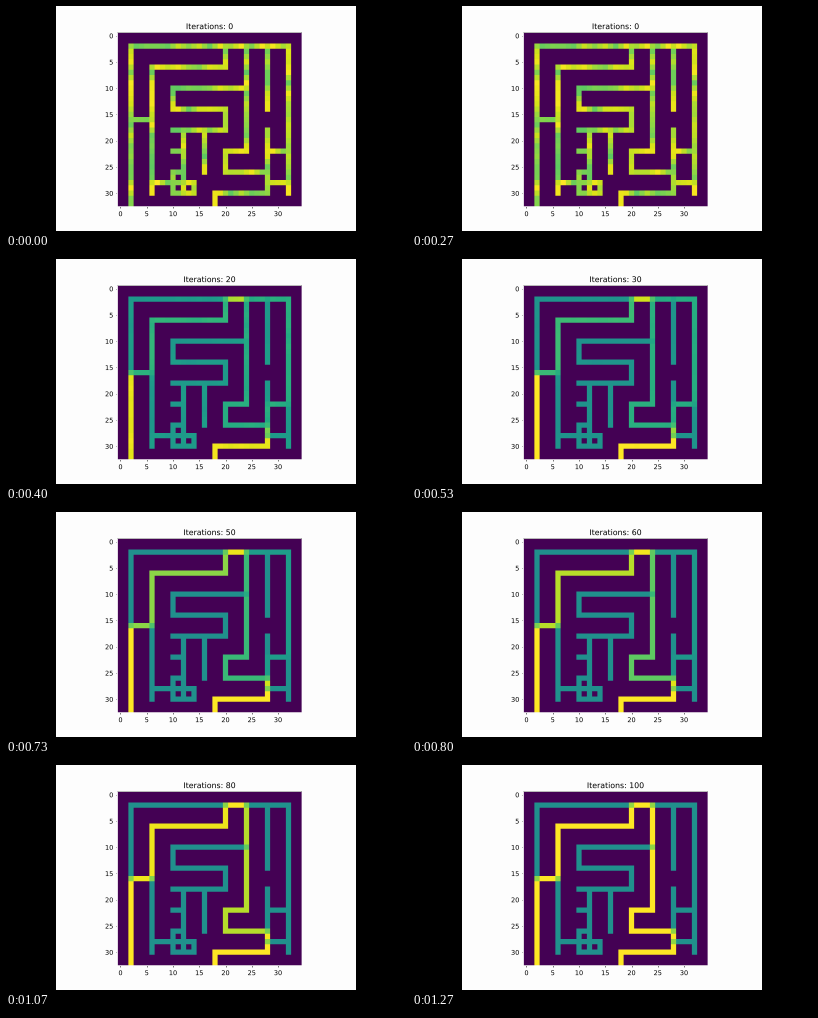
Animation, 400 px wide and 225 px high, one loop 1340 ms. Source, as a matplotlib script:

```python
import numpy as np
import matplotlib.pyplot as plt
from matplotlib.animation import FuncAnimation
from matplotlib.patches import Rectangle
from matplotlib.patheffects import Normal

ROWS, COLS = 33, 35
SCALE = 0.46875  # a default 640x480 figure shrunk to 300x225
SUB = 8          # subdivisions of a pixel
CELL = 42        # side of a maze cell in subdivisions (5.25 px)
LOOP, INTERVAL = 1340, 10
LAST_STEP = 10
DECAY = 0.35     # what is left of the starting tube after ten iterations
PAPER = "#fdfdfd"

# Flow through each kind of corridor, keyed by iteration / 10.
STEPS = [0, 1, 3, 5, 7, 10]
FLOW = {
    "entry": [0, 0.72, 0.97, 1, 1, 1],
    "join": [0, 0.35, 0.66, 0.85, 0.96, 1],
    "bridge": [0, 0.50, 0.82, 0.94, 0.98, 1],
    "left": [0, 0.08, 0.33, 0.65, 0.92, 1],
    "right": [0, 0.06, 0.23, 0.35, 0.66, 1],
    "detour": [0, 0.10, 0.20, 0.10, 0.03, 0],
    "dead": [0, 0, 0, 0, 0, 0],
}

# Corridors as polylines of (column, row) corners.
CORRIDORS = [
    ("entry", [(2, 32), (2, 16)]),
    ("entry", [(18, 32), (18, 30), (28, 30), (28, 28)]),
    ("join", [(28, 28), (28, 26)]),
    ("bridge", [(20, 2), (24, 2)]),
    ("left", [(2, 16), (6, 16), (6, 6), (20, 6), (20, 2)]),
    ("right", [(24, 2), (24, 22), (20, 22), (20, 26), (28, 26)]),
    ("detour", [(24, 2), (32, 2), (32, 22), (28, 22), (28, 26)]),
    ("dead", [(2, 16), (2, 2), (20, 2)]),
    ("dead", [(28, 28), (32, 28)]),
    ("dead", [(32, 22), (32, 30)]),
    ("dead", [(28, 2), (28, 14)]),
    ("dead", [(28, 18), (28, 22)]),
    ("dead", [(24, 10), (10, 10), (10, 14), (20, 14), (20, 18), (10, 18)]),
    ("dead", [(6, 16), (6, 30)]),
    ("dead", [(16, 18), (16, 26)]),
    ("dead", [(12, 18), (12, 30)]),
    ("dead", [(10, 22), (12, 22)]),
    ("dead", [(12, 26), (10, 26), (10, 30), (14, 30), (14, 28)]),
    ("dead", [(6, 28), (14, 28)]),
]

rng = np.random.default_rng(12)


def nodes_along(corners):
    """Every second cell on the way through the corners."""
    nodes = [corners[0]]
    for (c0, r0), (c1, r1) in zip(corners, corners[1:]):
        dc, dr = 2 * np.sign(c1 - c0), 2 * np.sign(r1 - r0)
        while nodes[-1] != (c1, r1):
            c, r = nodes[-1]
            nodes.append((int(c + dc), int(r + dr)))
    return nodes


def build_edges():
    edges = {}
    for kind, corners in CORRIDORS:
        nodes = nodes_along(corners)
        for a, b in zip(nodes, nodes[1:]):
            edges[tuple(sorted((a, b)))] = (kind, rng.uniform(0.5, 1))
    return edges


EDGES = build_edges()


def maze_cells(step):
    total = np.zeros((ROWS, COLS))
    count = np.zeros((ROWS, COLS))
    flow = {kind: np.interp(step, STEPS, keys) for kind, keys in FLOW.items()}
    for ((c0, r0), (c1, r1)), (kind, start) in EDGES.items():
        tube = min(1, start * DECAY ** step + flow[kind])
        middle = ((c0 + c1) // 2, (r0 + r1) // 2)
        for c, r in ((c0, r0), middle, (c1, r1)):
            total[r, c] += 0.5 + 0.5 * tube
            count[r, c] += 1
    return total / np.maximum(count, 1)


def maze_image(step):
    """The maze on whole pixels, with edge pixels blended by coverage."""
    colours = plt.cm.viridis(maze_cells(step))
    fine = np.kron(colours, np.ones((CELL, CELL, 1)))
    # The maze starts 7/8 px into its first column of pixels.
    fine = np.pad(fine, ((0, 6), (7, 3), (0, 0)),
                  constant_values=int(PAPER[1:3], 16) / 255)
    h, w = fine.shape[0] // SUB, fine.shape[1] // SUB
    return fine.reshape(h, SUB, w, SUB, 4).mean(axis=(1, 3))


IMAGES = [maze_image(step) for step in range(LAST_STEP + 1)]

plt.rcParams.update({
    "font.family": "DejaVu Sans",
    "text.hinting": "none",
    "font.size": 10 * SCALE,
    "axes.titlesize": 12 * SCALE,
    "axes.titlepad": 6 * SCALE,
    "axes.linewidth": 0.8 * SCALE,
})
for axis in ("xtick", "ytick"):
    plt.rcParams.update({
        f"{axis}.labelsize": 10 * SCALE,
        f"{axis}.major.size": 3.5 * SCALE,
        f"{axis}.major.width": 0.8 * SCALE,
        f"{axis}.major.pad": 3.5 * SCALE,
    })

fig = plt.figure(figsize=(4, 2.25), dpi=100, facecolor=PAPER)
for x in (0, 0.875):
    fig.add_artist(Rectangle((x, 0), 0.125, 1, transform=fig.transFigure,
                             facecolor="black", linewidth=0))
picture = fig.figimage(IMAGES[0], xo=111, yo=24, origin="upper")

ax = fig.add_axes([111.875 / 400, 0.11, 183.75 / 400, 0.77], facecolor="none")
ax.set(xlim=(-0.5, COLS - 0.5), ylim=(ROWS - 0.5, -0.5),
       xticks=range(0, 31, 5), yticks=range(0, 31, 5))
title = ax.set_title("Iterations: 0")
for spine in ax.spines.values():
    spine.set_snap(False)
# Path effects draw text as outlines, free of the pixel grid.
for text in [title, *ax.get_xticklabels(), *ax.get_yticklabels()]:
    text.set_path_effects([Normal()])


def update(frame):
    # The picture changes on a 15 fps clock rounded to 10 ms;
    # after a short lead-in, ten iterations pass every 1.5 ticks.
    tick = (frame * INTERVAL + 5) * 3 // 200
    step = min(LAST_STEP, max(0, 2 * (tick - 3) // 3))
    picture.set_data(IMAGES[step])
    title.set_text(f"Iterations: {10 * step}")
    return picture, title


anim = FuncAnimation(fig, update, frames=LOOP // INTERVAL, interval=INTERVAL,
                     repeat=True, repeat_delay=0, blit=False)
plt.show()
```
